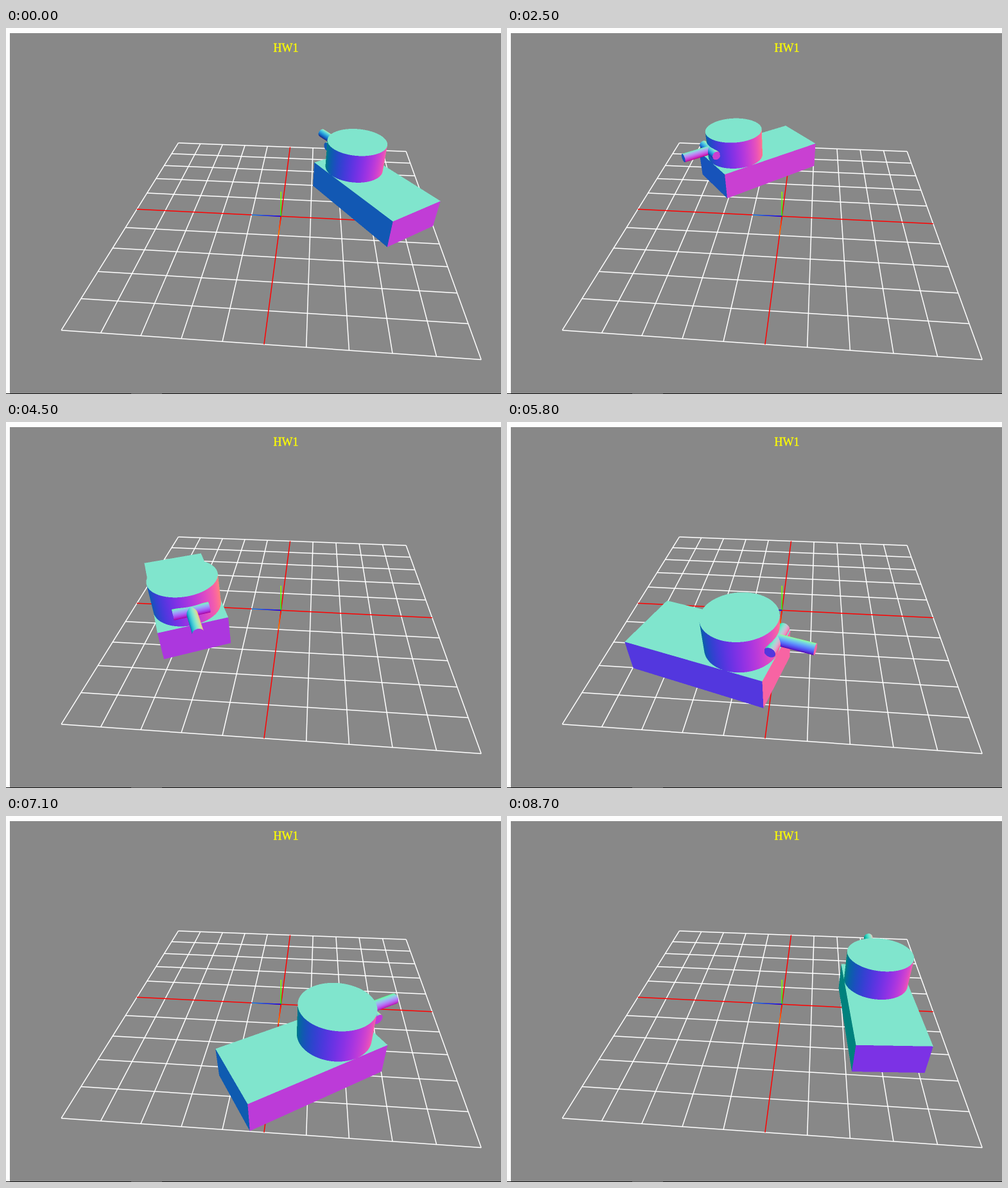
Write an HTML page with a canvas that moves like this. It is 771 px wide and 570 px high and loops after 8800 ms.

```html
<!DOCTYPE html>
<html lang="en">
<head>
<meta charset="utf-8">
<title>HW1</title>
<style>
  html, body { margin: 0; width: 100%; height: 100%; overflow: hidden; background: #fdfdfd; }
  svg, canvas { position: absolute; left: 0; top: 0; display: block; }
  text { font: 18px "Liberation Serif", "Times New Roman", serif; fill: #ff0; stroke: #ff0; stroke-width: .3; }
</style>
</head>
<body>
<svg id="scene" width="771" height="570" viewBox="0 0 771 570">
  <rect x="6" y="8" width="765" height="562" fill="#888"/>
  <g id="grid" stroke-width="1.5"></g>
  <text x="416.5" y="37">HW1</text>
  <rect y="569" width="771" height="1" fill="#151515"/>
  <rect x="195" y="569" width="48" height="1" fill="#555"/>
</svg>
<canvas id="tank" width="771" height="570"></canvas>
<script>
const LOOP = 8800, STEP = 100;
const CX = 428.3, CY = 293.3, FOCAL = 611, DIST = 13.25;
const PITCH = 0.6548, YAW = 0.0803;
const SIN = Math.sin(PITCH), COS = Math.cos(PITCH);
const RADIUS = 3, START = -0.539, TURN = -0.06575;

// Axes: x to the right, y up, z towards the camera.
function project(x, y, z) {
  const k = FOCAL / (DIST - COS * z - SIN * y);
  return [CX + k * x, CY + k * (SIN * z - COS * y)];
}

// The floor is turned a little against the camera.
function floorPoint(x, y, z) {
  const s = Math.sin(YAW), c = Math.cos(YAW);
  return project(-x * s - z * c, y, x * c - z * s);
}

const grid = document.getElementById('grid');

function add(name, attrs, parent = grid) {
  const el = document.createElementNS('http://www.w3.org/2000/svg', name);
  for (const key in attrs) el.setAttribute(key, attrs[key]);
  return parent.appendChild(el);
}

function ends(from, to) {
  const [x1, y1] = floorPoint(...from), [x2, y2] = floorPoint(...to);
  return { x1, y1, x2, y2 };
}

function drawFloor() {
  const order = [1, 2, 3, 4, 5, -1, -2, -3, -4, -5, 0];
  for (const i of order) {
    const stroke = i ? '#fff' : '#f00';
    add('line', { ...ends([i, 0, -5], [i, 0, 5]), stroke });
    add('line', { ...ends([-5, 0, i], [5, 0, i]), stroke });
  }
  const axes = [
    ['ax', [1, 0, 0], '#f00', '#f90'],
    ['ay', [0, 1, 0], '#0f0', '#9f0'],
    ['az', [0, 0, 1], '#00f', '#09f']
  ];
  for (const [id, tip, c1, c2] of axes) {
    const line = ends([0, 0, 0], tip);
    const grad = add('linearGradient', { id, gradientUnits: 'userSpaceOnUse', ...line });
    add('stop', { offset: 0, 'stop-color': c1 }, grad);
    add('stop', { offset: 1, 'stop-color': c2 }, grad);
    add('line', { ...line, stroke: `url(#${id})` });
  }
}

// Solids take a ray (o, d) and the nearest distance so far. On a closer hit
// they write the normal to n and return the new distance.
function box(lo, hi) {
  return (o, d, best, n) => {
    let near = -Infinity, far = Infinity, axis = 0;
    for (let i = 0; i < 3; i++) {
      const a = (lo[i] - o[i]) / d[i], b = (hi[i] - o[i]) / d[i];
      const enter = Math.min(a, b);
      if (enter > near) { near = enter; axis = i; }
      far = Math.min(far, Math.max(a, b));
    }
    if (near > far || near >= best) return best;
    n[0] = n[1] = n[2] = 0;
    n[axis] = -Math.sign(d[axis]);
    return near;
  };
}

function cylinder(axis, mid, r, half) {
  const j = (axis + 1) % 3, k = (axis + 2) % 3;
  return (o, d, best, n) => {
    const pj = o[j] - mid[j], pk = o[k] - mid[k], pa = o[axis] - mid[axis];
    const a = d[j] * d[j] + d[k] * d[k];
    const b = pj * d[j] + pk * d[k];
    const disc = b * b - a * (pj * pj + pk * pk - r * r);
    if (disc < 0) return best;
    let t = (-b - Math.sqrt(disc)) / a;
    if (Math.abs(pa + t * d[axis]) <= half) {
      if (t >= best) return best;
      n[axis] = 0;
      n[j] = (pj + t * d[j]) / r;
      n[k] = (pk + t * d[k]) / r;
      return t;
    }
    const side = Math.sign(pa);
    t = (side * half - pa) / d[axis];
    if (t >= best || t < 0 || Math.hypot(pj + t * d[j], pk + t * d[k]) > r) return best;
    n[j] = n[k] = 0;
    n[axis] = side;
    return t;
  };
}

// Tank axes: outwards from the circle, up, ahead. The turret stands at 0.
const solids = [
  box([-1, 0, -3], [1, 1, 1]),
  cylinder(1, [0, 1.5, 0], 1, 0.5),
  cylinder(0, [0, 1.5, 1], 0.15, 0.5),
  cylinder(2, [0, 1.5, 1.5], 0.15, 0.5)
];

const canvas = document.getElementById('tank');
const ctx = canvas.getContext('2d');

function bounds(ca, sa) {
  const xs = [], ys = [];
  for (const s of [-1, 1]) for (const y of [0, 2]) for (const d of [-3, 2.1]) {
    const out = s + RADIUS;
    const [px, py] = project(out * ca + d * sa, y, out * sa - d * ca);
    xs.push(px);
    ys.push(py);
  }
  const x = Math.floor(Math.min(...xs)) - 1, y = Math.floor(Math.min(...ys)) - 1;
  return { x, y, w: Math.ceil(Math.max(...xs)) + 1 - x, h: Math.ceil(Math.max(...ys)) + 1 - y };
}

function drawTank(angle) {
  const ca = Math.cos(angle), sa = Math.sin(angle);
  const area = bounds(ca, sa);
  const img = ctx.createImageData(area.w, area.h);
  const eyeY = DIST * SIN, eyeZ = DIST * COS;
  const o = [eyeZ * sa - RADIUS, eyeY, -eyeZ * ca];
  const d = [0, 0, 0], n = [0, 0, 0];

  for (let row = 0, at = 0; row < area.h; row++) {
    for (let col = 0; col < area.w; col++, at += 4) {
      let hits = 0, r = 0, g = 0, b = 0;
      for (let sub = 0; sub < 4; sub++) {
        const vx = (area.x + col + 0.25 + 0.5 * (sub & 1) - CX) / FOCAL;
        const vy = (CY - area.y - row - 0.25 - 0.5 * (sub >> 1)) / FOCAL;
        const wz = -vy * SIN - COS;
        d[0] = vx * ca + wz * sa;
        d[1] = vy * COS - SIN;
        d[2] = vx * sa - wz * ca;
        let best = Infinity;
        for (const solid of solids) best = solid(o, d, best, n);
        if (best === Infinity) continue;
        // The colour is the normal as the camera sees it.
        const nz = n[0] * sa - n[2] * ca;
        hits++;
        r += n[0] * ca + n[2] * sa;
        g += n[1] * COS - nz * SIN;
        b += n[1] * SIN + nz * COS;
      }
      if (!hits) continue;
      img.data[at] = 127.5 * (1 + r / hits);
      img.data[at + 1] = 127.5 * (1 + g / hits);
      img.data[at + 2] = 127.5 * (1 + b / hits);
      img.data[at + 3] = 255 * hits / 4;
    }
  }
  ctx.clearRect(0, 0, canvas.width, canvas.height);
  ctx.putImageData(img, area.x, area.y);
}

let shown = -1;

function tick() {
  const step = Math.floor(performance.now() % LOOP / STEP);
  if (step !== shown) {
    shown = step;
    drawTank(START + TURN * step);
  }
  requestAnimationFrame(tick);
}

drawFloor();
tick();
</script>
</body>
</html>
```
